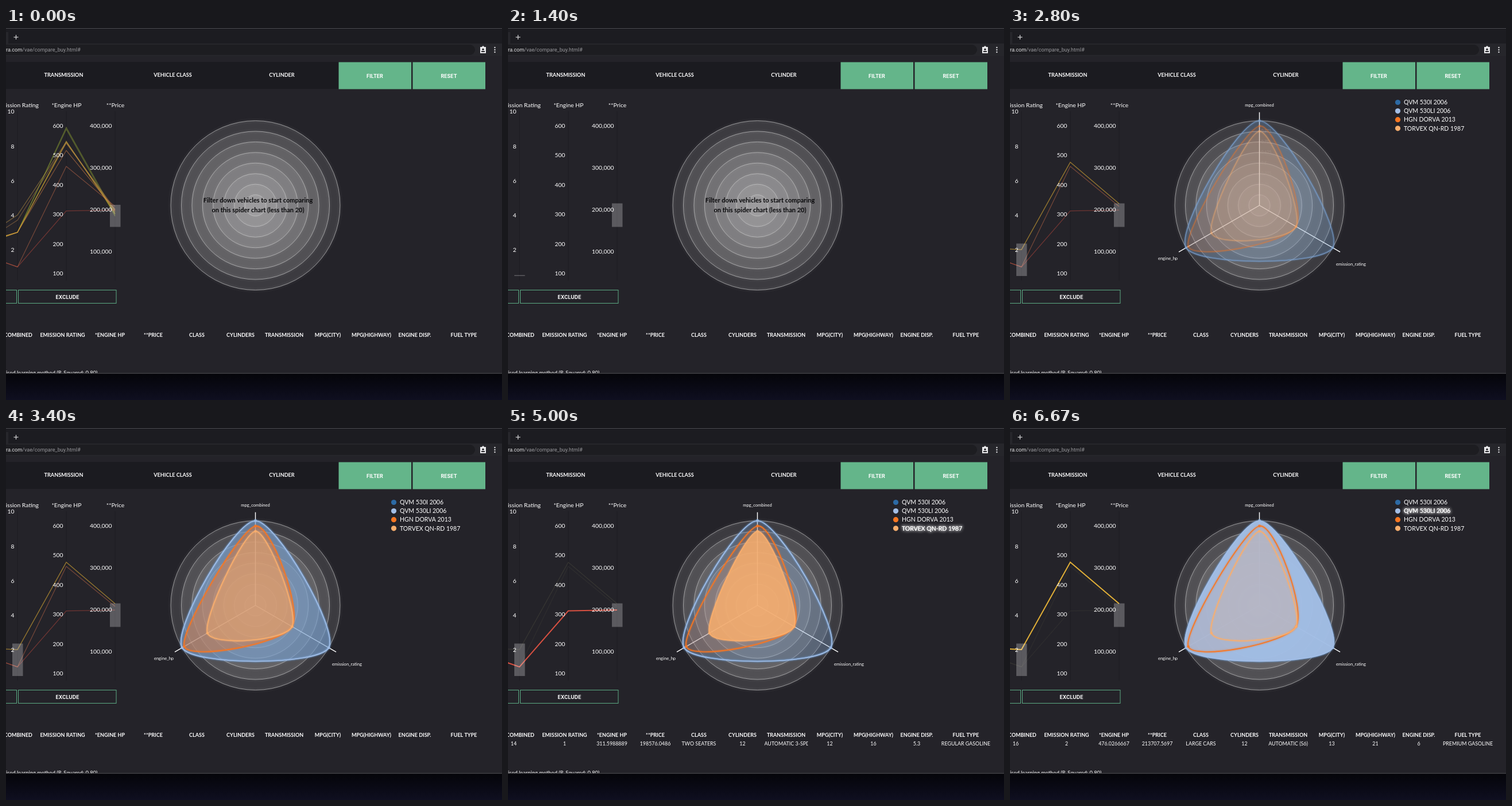
These frames come from a looping animation (864x648 px, 6740 ms). An HTML page with a canvas:

```html
<!DOCTYPE html>
<html lang="en">
<head>
<meta charset="utf-8">
<title>Vehicle comparison</title>
<style>
  html, body { margin: 0; width: 100%; height: 100%; overflow: hidden; background: #0a0a14; }
  canvas { display: block; }
</style>
</head>
<body>
<canvas id="stage" width="864" height="648"></canvas>
<script>
const ctx = document.getElementById('stage').getContext('2d');
const LOOP = 6740;
const LATO = 'Lato, sans-serif', INTER = 'Inter, sans-serif', ROBOTO = 'Roboto, sans-serif';

const CENTER = { x: 434.5, y: 309 }, RADIUS = 147.5, LEVELS = 8;
const AXIS_X = [-65, 20, 105, 190];
const yEmission = v => 446.3 - v * 30.13;
const yPower = v => 427.5 - (v - 100) * 0.515;
const yPrice = v => 389 - (v - 1e5) * 0.00073;

const CARS = [
  { name: 'QVM 530I 2006', color: '#2c6aa5', line: '225,175,55', mpg: 16, emission: 2, power: 476.0266667, price: 213707.5697, start: 382 },
  { name: 'QVM 530LI 2006', color: '#a3bee6', line: '225,175,55', mpg: 16, emission: 2, power: 476.0266667, price: 213707.5697, start: 382,
    rest: ['LARGE CARS', '12', 'AUTOMATIC (S6)', '13', '21', '6', 'PREMIUM GASOLINE'] },
  { name: 'HGN DORVA 2013', color: '#f87621', line: '226,120,80', mpg: 15, emission: 1, power: 462.0852778, price: 207143.6734, start: 386,
    rest: ['TWO SEATERS', '10', 'MANUAL 6-SPD', '12', '19', '8.4', 'PREMIUM GASOLINE'] },
  { name: 'TORVEX QN-RD 1987', color: '#f9ae6d', line: '215,80,65', mpg: 14, emission: 1, power: 311.5988889, price: 198576.0486, start: 386,
    rest: ['TWO SEATERS', '12', 'AUTOMATIC 3-SPD', '12', '16', '5.3', 'REGULAR GASOLINE'] }
];

// Lines visible before the second brush: [start y, emission, power, price, colour]
const EXTRA_LINES = [
  [382, 3, 594, 188000, '140,160,50'], [384, 3, 588, 184000, '140,160,50'],
  [380, 3, 547, 190000, '225,190,50'], [386, 3, 543, 194000, '225,175,50'],
  [382, 3, 516, 199000, '215,130,70'], [382, 4, 545, 197000, '190,150,70'],
  [390, 3.7, 540, 201000, '170,120,70']
];

const HEADERS = ['MPG COMBINED', 'EMISSION RATING', '*ENGINE HP', '**PRICE', 'CLASS', 'CYLINDERS',
  'TRANSMISSION', 'MPG(CITY)', 'MPG(HIGHWAY)', 'ENGINE DISP.', 'FUEL TYPE'];
const COLUMNS = [10, 98.5, 181, 256.5, 332.5, 408.5, 484.5, 560.5, 636.5, 712, 797.5];

const LEGEND_HOVER = [[0, -1], [3800, 2], [4550, 3], [6250, 1]];
const RADAR_HOVER = [[0, -1], [4800, 3], [5500, 2], [6400, 1]];

const ramp = (t, a, b) => Math.min(1, Math.max(0, (t - a) / (b - a)));
const mix = (a, b, k) => a + (b - a) * k;
const indexAt = (events, t) => events.filter(e => e[0] <= t).length - 1;

function rect(x, y, w, h, fill) {
  ctx.fillStyle = fill;
  ctx.fillRect(x, y, w, h);
}

// y is the middle of the capitals
function text(str, x, y, size, { align = 'center', weight = 400, color = '#fff', font = LATO } = {}) {
  ctx.font = `${weight} ${size}px ${font}`;
  ctx.textAlign = align;
  ctx.fillStyle = color;
  ctx.fillText(str, x, y + size * 0.36);
}

function circle(x, y, r) {
  ctx.beginPath();
  ctx.arc(x, y, r, 0, Math.PI * 2);
}

function polyline(points, color, width) {
  ctx.beginPath();
  points.forEach(([x, y]) => ctx.lineTo(x, y));
  ctx.strokeStyle = color;
  ctx.lineWidth = width;
  ctx.stroke();
}

function drawBrowser() {
  rect(0, 0, 864, 602, '#242329');
  rect(0, 0, 864, 29, '#1c1c21');
  rect(0, 0, 864, 1, '#4b4b50');
  rect(0, 27, 864, 22, '#26262b');
  rect(0, 7, 4, 20, '#26262b');
  ctx.fillStyle = '#1d1d21';
  ctx.beginPath();
  ctx.roundRect(-20, 29, 837, 18, 9);
  ctx.fill();
  polyline([[13.5, 16], [21.5, 16]], '#d6d6d8', 1.2);
  polyline([[17.5, 12], [17.5, 20]], '#d6d6d8', 1.2);

  text('ra.com', 0, 38, 9.1, { align: 'left', font: ROBOTO, color: '#e4e4e6' });
  text('/vae/compare_buy.html#', ctx.measureText('ra.com').width, 38, 9.1, { align: 'left', font: ROBOTO, color: '#98989c' });

  rect(826, 33, 10, 11, '#e8e8ea');
  circle(831, 33, 1.8); ctx.fill();
  ctx.fillStyle = '#26262b';
  circle(831, 37.2, 1.7); ctx.fill();
  rect(828, 40, 6, 2, '#26262b');
  ctx.fillStyle = '#e0e0e2';
  for (const y of [34, 38, 42]) { circle(851.5, y, 1.2); ctx.fill(); }

  rect(0, 59, 580, 47, '#1b1b20');
  text('TRANSMISSION', 100.5, 82, 9.1, { weight: 700 });
  text('VEHICLE CLASS', 290.5, 82, 9.1, { weight: 700 });
  text('CYLINDER', 480.5, 82, 9.1, { weight: 700 });
  for (const [x, label] of [[579.5, 'FILTER'], [708.5, 'RESET']]) {
    rect(x, 59.5, 126.5, 47, '#64b58a');
    text(label, x + 63, 84, 8.8, { weight: 700, font: INTER });
  }

  ctx.strokeStyle = '#5cab84';
  ctx.lineWidth = 1;
  ctx.strokeRect(-10.5, 456.5, 29, 23);
  ctx.strokeRect(21.5, 456.5, 170.5, 23);
  text('EXCLUDE', 107, 468.5, 8.8, { weight: 700, font: INTER });

  HEADERS.forEach((label, i) => text(label, COLUMNS[i], 534.5, 9, { weight: 700 }));
  text('ised learning method (R-Squared: 0.80)', 0, 601, 9.4, { align: 'left' });
}

function drawDesktop() {
  const shade = ctx.createLinearGradient(0, 602, 0, 648);
  shade.addColorStop(0, '#050509');
  shade.addColorStop(0.35, '#080811');
  shade.addColorStop(1, '#0f0f20');
  rect(0, 602, 864, 46, shade);
  rect(0, 601, 864, 1.2, '#48484c');
}

function drawParallel(t, brushTop, active) {
  AXIS_X.slice(1).forEach(x => polyline([[x, 145], [x, 440]], '#1d1d22', 1));

  const draw = (start, emission, power, price, rgb, alpha, width) => polyline([
    [AXIS_X[0], start], [AXIS_X[1], yEmission(emission)],
    [AXIS_X[2], yPower(power)], [AXIS_X[3], yPrice(price)]
  ], `rgba(${rgb},${alpha})`, width);

  if (t < 1100) EXTRA_LINES.forEach(line => draw(...line, 0.5, 1.3));
  CARS.forEach((car, i) => {
    const inBrush = t >= 1400 && yEmission(car.emission) >= brushTop;
    if (!inBrush && !(t < 1100 && i > 1)) return;
    const values = [car.start, car.emission, car.power, car.price];
    if (active < 0) draw(...values, car.line, i < 2 ? 0.36 : 0.42, 1.3);
    else if (i === active) draw(...values, car.line, 1, 2);
    else draw(...values, '120,120,90', 0.13, 1.2);
  });

  const priceTop = mix(308, 305.5, ramp(t, 100, 700));
  rect(181, priceTop, 18.5, 346.5 - priceTop, 'rgba(255,255,255,.25)');
  if (t >= 1330) rect(11, brushTop, 18.5, 432 - brushTop, 'rgba(255,255,255,.25)');

  text('*Emission Rating', 57, 134, 10.4, { align: 'right' });
  text('*Engine HP', 105.5, 134, 10.4);
  text('**Price', 190.5, 134, 10.4);
  const tick = (label, x, y) => text(label, x, y, 10.4, { align: 'right' });
  for (let v = 2; v <= 10; v += 2) tick(v, 14.5, yEmission(v) + 0.5);
  for (let v = 100; v <= 600; v += 100) tick(v, 99.5, yPower(v) + 0.2);
  for (let v = 1; v <= 4; v++) tick(v + '00,000', 184.5, yPrice(v * 1e5) + 0.2);
}

function polar(axis, ratio) {
  const angle = axis * Math.PI * 2 / 3 - Math.PI / 2;
  return [CENTER.x + Math.cos(angle) * ratio * RADIUS, CENTER.y + Math.sin(angle) * ratio * RADIUS];
}

function closedCurve(p) {
  const at = i => p[(i + p.length) % p.length];
  const handle = (i, sign) => [0, 1].map(d => at(i)[d] + sign * (at(i + 1)[d] - at(i - 1)[d]) / 7);
  ctx.beginPath();
  ctx.moveTo(...p[0]);
  p.forEach((_, i) => ctx.bezierCurveTo(...handle(i, 1), ...handle(i + 1, -1), ...at(i + 1)));
}

function drawRings() {
  ctx.save();
  for (let level = LEVELS; level > 0; level--) {
    circle(CENTER.x, CENTER.y, RADIUS * level / LEVELS);
    ctx.shadowBlur = 0;
    ctx.fillStyle = 'rgba(205,205,205,.14)';
    ctx.fill();
    ctx.shadowColor = 'rgba(205,205,205,.6)';
    ctx.shadowBlur = 5;
    ctx.strokeStyle = 'rgba(205,205,205,.65)';
    ctx.lineWidth = 1;
    ctx.stroke();
  }
  ctx.restore();
}

function areaOpacity(car, t) {
  const level = hovered => hovered < 0 ? 0.4 : hovered === car ? 0.97 : 0.1;
  const i = indexAt(RADAR_HOVER, t);
  const [start, now] = RADAR_HOVER[i];
  return i ? mix(level(RADAR_HOVER[i - 1][1]), level(now), ramp(t, start, start + 250)) : level(now);
}

function drawRadar(t, shown) {
  for (let level = 1; level < LEVELS; level++) {
    const ratio = level / LEVELS;
    text(String(ratio), CENTER.x + 3, CENTER.y - ratio * RADIUS, 7, { align: 'left', color: 'rgba(150,150,150,.6)' });
  }
  for (let axis = 0; axis < 3; axis++) polyline([[CENTER.x, CENTER.y], polar(axis, 1.1)], '#fff', 1.4);
  text('mpg_combined', CENTER.x, 134, 7.6);
  text('emission_rating', 594, 411, 7.6);
  text('engine_hp', 275, 401, 7.6);

  const keys = ['mpg', 'emission', 'power'];
  const max = keys.map(k => Math.max(...shown.map(car => car[k])));
  const fade = mix(0.38, 1, ramp(t, 2800, 3200));
  shown.forEach(car => {
    const points = keys.map((k, axis) => polar(axis, car[k] / max[axis]));
    ctx.save();
    closedCurve(points);
    ctx.globalAlpha = areaOpacity(CARS.indexOf(car), t) * fade;
    ctx.fillStyle = car.color;
    ctx.fill();
    ctx.globalAlpha = fade;
    ctx.strokeStyle = ctx.shadowColor = car.color;
    ctx.shadowBlur = 3;
    ctx.lineWidth = 1.6;
    ctx.stroke();
    ctx.shadowBlur = 0;
    ctx.globalAlpha = 0.8 * fade;
    points.forEach(p => { circle(...p, 2.4); ctx.fill(); });
    ctx.restore();
  });
}

function drawLegend(shown, active) {
  shown.forEach((car, i) => {
    const y = 129.5 + i * 15.1;
    ctx.fillStyle = car.color;
    circle(675.5, y, 4.6);
    ctx.fill();
    ctx.save();
    if (CARS[active] === car) {
      ctx.shadowColor = '#fff';
      ctx.shadowBlur = 5;
      text(car.name, 686, y, 10.5, { align: 'left' });
    }
    text(car.name, 686, y, 10.5, { align: 'left' });
    ctx.restore();
  });
}

function drawRow(car) {
  const cells = [car.mpg, car.emission, car.power.toFixed(7), car.price.toFixed(4), ...car.rest];
  cells.forEach((value, i) => {
    ctx.font = `400 9px ${LATO}`;
    const overflow = i === 6 && ctx.measureText(value).width > 76;
    ctx.save();
    if (overflow) {
      ctx.beginPath();
      ctx.rect(446.5, 542, 76, 16);
      ctx.clip();
    }
    text(value, overflow ? 446.5 : COLUMNS[i], 550, 8.9, { align: overflow ? 'left' : 'center' });
    ctx.restore();
  });
}

function render(t) {
  const brushTop = t < 1420 ? 430.5
    : t < 2050 ? mix(414, 386, ramp(t, 1470, 2050))
    : mix(386, 375.5, ramp(t, 2050, 2600));
  const active = LEGEND_HOVER[indexAt(LEGEND_HOVER, t)][1];
  const shown = t < 1530 ? [] : CARS.filter(car => yEmission(car.emission) >= brushTop);

  drawBrowser();
  drawParallel(t, brushTop, active);
  drawRings();
  if (shown.length) {
    drawRadar(t, shown);
    drawLegend(shown, active);
  } else {
    text('Filter down vehicles to start comparing', 439, 300, 11, { weight: 700, color: '#08080a' });
    text('on this spider chart (less than 20)', 439, 317.5, 11, { weight: 700, color: '#08080a' });
  }
  if (active >= 0) drawRow(CARS[active]);
  drawDesktop();
}

const began = performance.now();
function frame() {
  render((performance.now() - began) % LOOP);
  requestAnimationFrame(frame);
}
frame();
</script>
</body>
</html>
```
